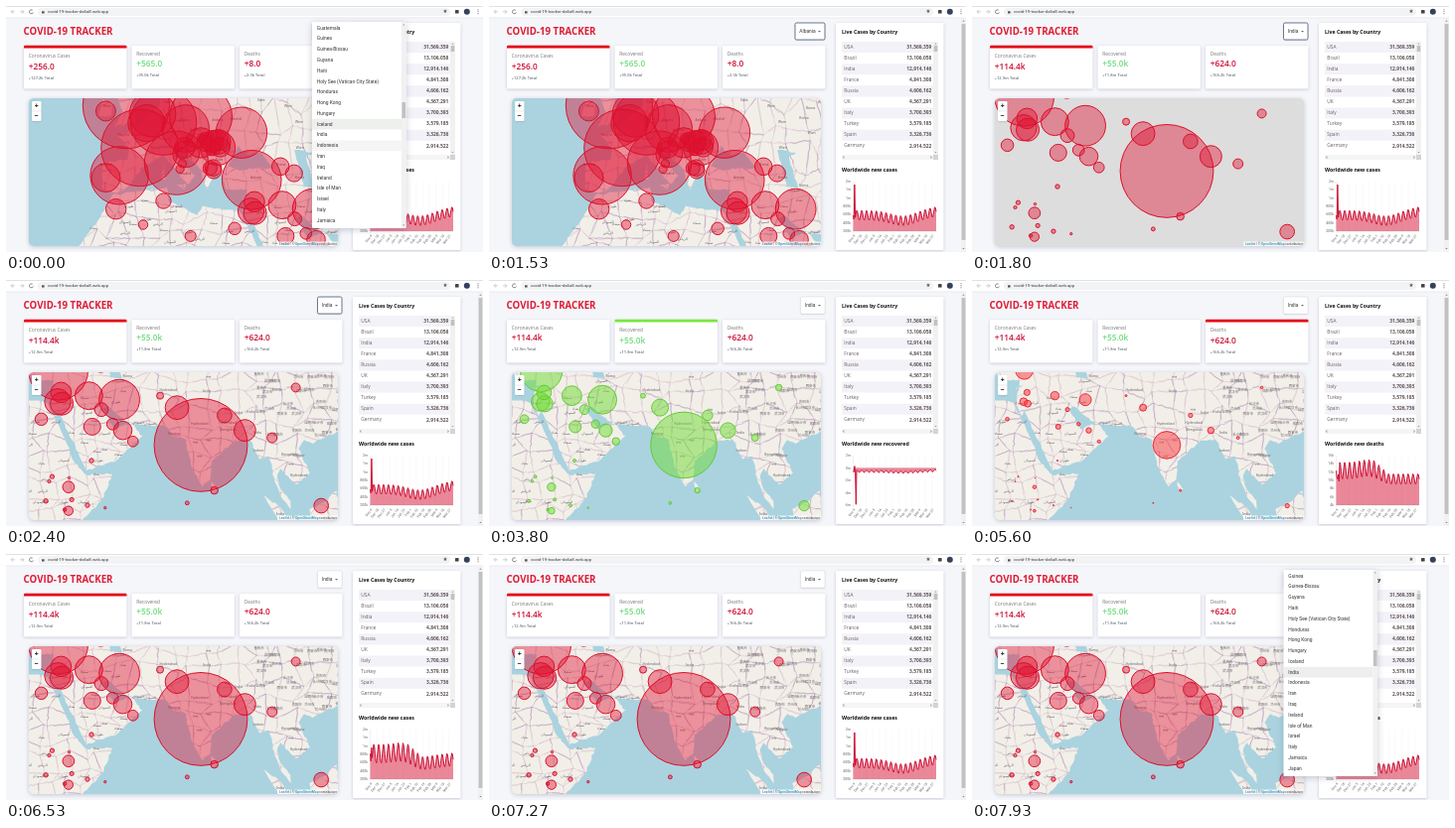
Write an HTML page with a canvas that moves like this. It is 480 px wide and 248 px high and loops after 8 s.

```html
<!DOCTYPE html>
<html lang="en">
<head>
<meta charset="utf-8">
<title>COVID-19 Tracker</title>
<style>
html, body { margin: 0; width: 100%; height: 100%; overflow: hidden; background: #f5f6fa; }
canvas { display: block; width: 480px; height: 248px; }
</style>
</head>
<body>
<canvas id="stage"></canvas>
<script>
const ratio = window.devicePixelRatio || 1;
function setUp(canvas) {
  canvas.width = 480 * ratio;
  canvas.height = 248 * ratio;
  const context = canvas.getContext('2d');
  context.scale(ratio, ratio);
  return context;
}
const page = setUp(document.getElementById('stage'));
let g = page;

const LOOP = 8000;
const T = { hover: 300, close: 600, load: 1800, blur: 3330, recovered: 3450, deaths: 5370, cases: 6400, open: 7500 };
const OPEN = '"Open Sans", sans-serif', ROBOTO = 'Roboto, sans-serif';
const RED = '#cc1034';

// ---- helpers ----
const clamp = v => Math.max(0, Math.min(1, v));
const easeOut = p => 1 - (1 - clamp(p)) ** 4;
const rad = d => d * Math.PI / 180;
// Repeatable random number from 0 to 1
function noise(a, b = 0) {
  const v = Math.sin(a * 127.1 + b * 311.7) * 43758.5453;
  return v - Math.floor(v);
}
function box(x, y, w, h, fill, r = 0, shadow = 0) {
  g.save();
  if (shadow) {
    g.shadowColor = 'rgba(70,75,110,.28)';
    g.shadowBlur = shadow * ratio;
    g.shadowOffsetY = shadow / 4 * ratio;
  }
  g.fillStyle = fill;
  g.beginPath();
  g.roundRect(x, y, w, h, r);
  g.fill();
  g.restore();
}
function text(s, x, y, size, color, weight = 400, font = OPEN, align = 'left') {
  g.font = `${weight} ${size}px ${font}`;
  g.fillStyle = color;
  g.textAlign = align;
  g.textBaseline = 'middle';
  g.fillText(s, x, y);
}
function stroke(points, color, width = .7) {
  g.strokeStyle = color;
  g.lineWidth = width;
  g.beginPath();
  points.forEach(([x, y]) => g.lineTo(x, y));
  g.stroke();
}
function triangle(x, y, r, color, dir = 1) {
  g.fillStyle = color;
  g.beginPath();
  g.moveTo(x - r, y - dir * r / 2);
  g.lineTo(x + r, y - dir * r / 2);
  g.lineTo(x, y + dir * r / 2);
  g.fill();
}
function disc(x, y, r, color) {
  g.fillStyle = color;
  g.beginPath();
  g.arc(x, y, r, 0, 7);
  g.fill();
}

// ---- map: Mercator, coordinates are longitude,latitude ----
const SCALE = 3.4133, MID = [196, 166.4];
const mercator = lat => Math.log(Math.tan(Math.PI / 4 + rad(lat) / 2)) * 180 / Math.PI;
const project = ([lon, lat], [lon0, lat0]) =>
  [MID[0] + (lon - lon0) * SCALE, MID[1] - (mercator(lat) - mercator(lat0)) * SCALE];
const parse = s => s.split(' ').map(p => p.split(',').map(Number));

// Key points only; roughen() adds the small bays and capes
const lands = [
  '8,60 8,54 3.5,51.5 -1.5,49 -4.7,48.5 -1.2,46 -1.5,43.4 -9,43 -9,37 -5.5,36 -2,36.8 0,39 3.2,42 8.8,44.4 12,42 16,38 18.3,40 12.4,44.4 13.7,45.6 19.4,41.8 22,36.7 24,40.4 26.5,40 27.5,36.8 36,36.5 34.3,31.3 32.4,31.2 62,31 62,60',
  '-17,21 -10,29.5 -6,35.5 10,37.2 10.5,34 19,30.4 20.5,32.7 32.4,31.2 32.5,29.9 37.2,21 39.5,15.5 43.3,11.5 51,11.9 48,4.5 39,-5 -17,-5',
  '32.4,31.2 34.2,27.8 34.9,29.4 39,21.5 43.2,12.7 52.2,15.7 59.8,22.4 56.2,26.2 51.6,24.3 48,30 50,30.2 54.5,26.6 57.4,25.7 66.6,25.2 69,22.3 72.7,21.5 72.8,19 74.8,13 77.5,8.1 79.8,10.3 80.2,15.5 87,21.3 92,21.5 92,60 40,60',
  '91,22.5 94.3,16 97.2,16.8 98.7,10 100.3,6 103.5,1.3 103.4,4 100.3,8 99.5,11 100.5,13.3 105,8.7 109.2,12 105.8,19 107.5,21.4 110,20.4 114,22.4 117,23.6 125,26 125,60 91,60',
  '-5.5,50 -3,53 -5,56 -2,57.5 .3,53 1.5,51.2', '-10,52 -6.3,52.2 -6,54.5 -9,55',
  '8.3,39 9.6,39.2 9.2,42.9', '12.5,37.8 15.1,36.7 15.6,38.2', '32.3,34.9 34.5,35.6 33,34.6',
  '80,9.7 81.8,7.5 80.6,6', '95.3,5.6 100.5,2.1 104,-3 101,-3', '109,1.5 113.5,3.6 117,7 118,-3 110,-3'
].map(parse);
const seas = [
  '28,42 31,46.4 33.6,44.5 37.5,45 41.5,41.5 36,41.7 31,41.2',
  '47.5,45.5 53,45 51,44 53.8,37 50.3,37.4 49.5,40.5'
].map(parse);

function roughen(points) {
  return points.flatMap(([x, y], i) => {
    const [x2, y2] = points[(i + 1) % points.length];
    const n = Math.ceil(Math.hypot(x2 - x, y2 - y) / .9);
    return Array.from({ length: n }, (_, k) => {
      const amp = k ? .45 : 0;
      return [x + (x2 - x) * k / n + amp * (noise(x + k, y) - .5), y + (y2 - y) * k / n + amp * (noise(y, x + k) - .5)];
    });
  });
}
function outline(shapes, center) {
  const path = new Path2D();
  for (const shape of shapes) {
    roughen(shape).forEach((p, i) => path[i ? 'lineTo' : 'moveTo'](...project(p, center)));
    path.closePath();
  }
  return path;
}
const words = {
  east: ['西安市', '成都市', '重庆市', '武汉市', '昆明市', '兰州市', '长沙市', '贵阳市'],
  south: ['Nagpur', 'Hyderabad', 'Bengaluru', 'Indore', 'नगर', 'India'],
  middle: ['الرياض', 'بغداد', 'صنعاء', 'طهران', 'السودان'],
  europe: ['Madrid', 'Roma', 'Київ', 'Wien', 'Ankara']
};
const region = (lon, lat) => lon > 94 && lat > 21 ? 'east' : lon > 62 ? 'south' : lat < 37 ? 'middle' : 'europe';

// Still part of the map, painted once for each place
function paintGround(center) {
  const canvas = document.createElement('canvas');
  g = setUp(canvas);
  box(23, 93, 311, 149, '#aad3df');
  const land = outline(lands, center), water = outline(seas, center);
  g.fillStyle = '#f2efe9';
  g.fill(land);
  g.save();
  g.clip(land);
  // Irregular cells stand for states and their borders
  const node = (i, j) => [i * 4.5 + 4 * noise(i, j), j * 4 + 3.5 * noise(j, i + 50)];
  for (let i = -8; i < 28; i++) for (let j = -2; j < 15; j++) {
    const color = noise(i, j + 9) > .55 ? 'rgba(150,105,160,.6)' : 'rgba(190,150,175,.5)';
    for (const end of [node(i + 1, j), node(i, j + 1)]) {
      stroke(roughen([node(i, j), end]).slice(0, -1).map(p => project(p, center)), color, .5);
    }
  }
  g.restore();
  g.fillStyle = '#aad3df';
  g.fill(water);
  for (let i = -10; i < 40; i++) for (let j = -1; j < 20; j++) {
    const lon = i * 3 + 2 * noise(i, j), lat = j * 2.8 + 2 * noise(j, i);
    const [x, y] = project([lon, lat], center), zone = region(lon, lat);
    const onLand = g.isPointInPath(land, x * ratio, y * ratio) && !g.isPointInPath(water, x * ratio, y * ratio);
    if (!onLand || noise(i + 7, j) > (zone === 'east' ? .75 : .25)) continue;
    const list = words[zone];
    text(list[Math.floor(noise(i, j + 3) * list.length)], x, y, 3.4, '#6b656b', 400, '"Noto Sans", "Noto Sans CJK SC", sans-serif', 'center');
  }
  g = page;
  return canvas;
}

// longitude, latitude, thousands of cases
const countries = [
  '-2,54,4367 2,46,4841 9,51,2914 12.8,42.8,3700 -4,40,3326 -8,39.5,826 20,52,2500 15.5,49.8,1570 5.8,52.5,1340 4,50.8,920 20,47,713 25,46,1000 32,49,1890 -8,53,240 -5,32,500 9,34,268 3,28,118 17,25,166',
  '53,32,1984 35,39,3579 44,33,912 34.8,31.5,835 36,31,650 35.8,33.8,487 47.7,29.5,243 45,25,395 54,24,480 51,25.7,187 57,21,167 30,27,207 43.5,42,285 47.5,40.5,279',
  '77,20,12914 70,30,710 90,24,667 84,28,280 81,7,94 65,33,57 98,22,142 112.5,2.5,358 105,35,90 38,8,225 38,1,143 73,3.3,25'
].flatMap(parse);
// Crowded small states of central Europe, then scattered small outbreaks in the south
for (let i = 0; i < 18; i++) countries.push([13 + 13 * noise(i, 1), 41 + 8 * noise(i, 2), 60 + 550 * noise(i, 3) ** 2]);
for (let i = 0; i < 9; i++) countries.push([30 + 20 * noise(i, 4), 1 + 16 * noise(i, 5), 3 + 30 * noise(i, 6)]);

const FATALITY = .013;
const circles = {
  cases: { k: .388, share: 1, stroke: '#dc1028', fill: 'rgba(222,16,48,.42)' },
  recovered: { k: .287, share: .92, stroke: '#62cb32', fill: 'rgba(112,220,52,.5)' },
  deaths: { k: 1, share: FATALITY, stroke: '#f02436', fill: 'rgba(251,58,62,.5)' }
};
const views = [[20, 41], [77, 20]].map(center => ({ center, ground: paintGround(center) }));

function drawMap(t, type) {
  const { center, ground } = views[+(t >= T.load)];
  box(23, 93, 311, 149, '#ddd', 5, 4);
  g.save();
  g.beginPath();
  g.roundRect(23, 93, 311, 149, 5);
  g.clip();
  g.globalAlpha = t < T.load ? 1 : clamp((t - T.load) / 250);
  g.drawImage(ground, 0, 0, 480, 248);
  g.globalAlpha = 1;
  const style = circles[type];
  for (const [lon, lat, cases] of countries) {
    const r = style.k * Math.sqrt(cases * style.share) / Math.cos(rad(lat));
    disc(...project([lon, lat], center), r, style.fill);
    g.strokeStyle = style.stroke;
    g.lineWidth = 1;
    g.stroke();
  }
  box(26, 96, 9.5, 20, '#fff', 1.2, 1.5);
  stroke([[26, 106], [35.5, 106]], '#ccc', .4);
  text('+', 30.7, 100.8, 7, '#111', 700, OPEN, 'center');
  text('−', 30.7, 110.8, 7, '#111', 700, OPEN, 'center');
  box(273, 237.4, 61, 4.6, 'rgba(255,255,255,.72)');
  text('Leaflet', 275, 239.8, 3.4, '#0078a8', 400, ROBOTO);
  text('| ©', 286.2, 239.8, 3.4, '#444', 400, ROBOTO);
  text('OpenStreetMap', 291, 239.8, 3.4, '#0078a8', 400, ROBOTO);
  text('contributors', 315, 239.8, 3.4, '#444', 400, ROBOTO);
  g.restore();
}

// ---- page ----
function drawBrowser(locked) {
  box(0, 0, 480, 12, '#fff');
  box(0, 0, 480, 1, '#dee1e6');
  for (const [tail, tip] of [[9, 5], [14, 18]]) {
    const back = tip + Math.sign(tail - tip) * 2;
    stroke([[tail, 5.8], [tip, 5.8]], '#bbb');
    stroke([[back, 3.8], [tip, 5.8], [back, 7.8]], '#bbb');
  }
  g.strokeStyle = '#555';
  g.beginPath();
  g.arc(25.5, 5.8, 2, .3, 5.4);
  g.stroke();
  box(32, 2, 415, 8, '#f1f3f4', 4);
  box(36, 5.2, 2.6, 2.2, '#555', .3);
  text('covid-19-tracker-da6a8.web.app', 42, 6, 4.3, '#333', 400, ROBOTO);
  text('★', 442, 6, 5.5, '#555', 400, '"DejaVu Sans", sans-serif', 'center');
  box(452, 4, 3.6, 3.6, '#444', .6);
  disc(463.8, 5.8, 3, '#33415c');
  [3.8, 5.8, 7.8].forEach(y => disc(475, y, .5, '#444'));
  stroke([[0, 11.8], [480, 11.8]], '#dadce0', .5);
  if (locked) return;
  box(475, 12, 5, 236, '#f1f1f1');
  box(475.6, 18, 3.8, 218, '#c1c1c1');
  triangle(477.5, 15, 1.2, '#666', -1);
  triangle(477.5, 244.5, 1.2, '#666');
}

const stats = [
  { type: 'cases', title: 'Coronavirus Cases', color: RED, bar: '#e60014', data: [['+256.0', '+127.2k'], ['+114.4k', '+12.9m']] },
  { type: 'recovered', title: 'Recovered', color: '#70dc80', bar: '#78e83c', data: [['+565.0', '+95.0k'], ['+55.0k', '+11.8m']] },
  { type: 'deaths', title: 'Deaths', color: RED, bar: '#e60014', data: [['+8.0', '+2.3k'], ['+624.0', '+166.2k']] }
];
function drawHeader(t, type) {
  text('COVID-19 TRACKER', 17.6, 26.2, 9.7, '#e01c34', 700);
  const loaded = t >= T.load;
  const left = loaded ? 313.5 : 308;
  box(left, 17, 338 - left, 17, '#fff', 1.5, 1.5);
  const focused = t > T.close && t < T.blur;
  g.strokeStyle = focused ? '#465a70' : '#d4d6dc';
  g.lineWidth = focused ? .8 : .4;
  g.beginPath();
  g.roundRect(left, 17, 338 - left, 17, 1.5);
  g.stroke();
  text(loaded ? 'India' : 'Albania', left + 4.3, 25.8, 4.9, '#333', 400, ROBOTO);
  triangle(332.5, 25.8, 1.5, '#666');
  stats.forEach((s, i) => {
    const [value, total] = s.data[+loaded];
    const x = 18 + i * 108.5, active = s.type === type;
    const y = active ? 42.8 : 40;
    box(x, 40, 103.5, 43.5, '#fff', 1.2, 3);
    if (active) box(x, 39.8, 103.5, 2.8, s.bar, [1.2, 1.2, 0, 0]);
    text(s.title, x + 4.8, y + 8.4, 4.85, '#777');
    text(value, x + 4.8, y + 18.6, 8.3, s.color, 600);
    text(total + ' Total', x + 4.8, y + 30, 4, '#6c757d', 600);
  });
}

const table = [['USA', '31,569,359'], ['Brazil', '13,106,058'], ['India', '12,914,146'], ['France', '4,841,308'],
  ['Russia', '4,606,162'], ['UK', '4,367,291'], ['Italy', '3,700,393'], ['Turkey', '3,579,185'],
  ['Spain', '3,326,736'], ['Germany', '2,914,522']];
function drawTable() {
  box(349, 17, 108.5, 229, '#fff', 1.2, 3);
  text('Live Cases by Country', 355, 26.2, 5.2, '#111', 700);
  table.forEach(([name, count], i) => {
    const y = 41.5 + i * 11.08;
    if (i % 2 === 0) box(355, y - 5.5, 92, 11.08, '#f3f2f8');
    text(name, 357.3, y, 4.8, '#6a5d5d');
    text(count, 445.4, y, 4.9, '#5f5454', 700, OPEN, 'right');
  });
  box(447, 36, 5, 114, '#f1f1f1');
  box(447.7, 40, 3.6, 6, '#c1c1c1');
  triangle(449.5, 38, 1, '#777', -1);
  triangle(449.5, 147.5, 1, '#777');
  box(355, 150, 92, 5, '#f5f5f5');
  box(447, 150, 5, 5, '#d4d4d4');
  text('‹', 357, 152.2, 5, '#777', 700, OPEN, 'center');
  text('›', 445, 152.2, 5, '#777', 700, OPEN, 'center');
}

// ---- chart: each series gives the line height for a day ----
const DAYS = 120, LEFT = 366.5, RIGHT = 450, BOTTOM = 227, ZERO = 189.5;
const bump = (i, at, width) => Math.exp(-(((i - at) / width) ** 2));
const week = i => Math.sin(i / 7 * 2 * Math.PI);
const series = {
  cases: i => i === 2 ? 180 : 211 + 6 * bump(i, 72, 25) - 4 * (i / DAYS) ** 4 + 5 * week(i),
  recovered: i => i === 4 ? 230 : ZERO - .6 + .3 * week(i),
  deaths: i => {
    const fall = clamp((i - 55) / 20);
    return 194 - 4 * bump(i, 45, 15) + 13 * fall + (13 - 5 * fall) * week(i);
  }
};
const ticks = {
  cases: ['2m', '1m', '1m', '800k', '600k', '400k', '200k'],
  recovered: ['2m', '0m', '-2m', '-4m', '-6m'],
  deaths: ['16k', '14k', '12k', '10k', '8k', '6k', '4k']
};
function drawChart(type, from, progress) {
  text('Worldwide new ' + type, 355, 165.4, 5.25, '#111', 700);
  const labels = ticks[type];
  labels.forEach((s, i) => text(s, 364, 177 + i * 50 / (labels.length - 1), 3.5, '#666', 400, ROBOTO, 'right'));
  stroke([[LEFT, 177], [LEFT, BOTTOM + 2]], '#ddd', .4);
  for (let i = 0; i < 13; i++) {
    const x = LEFT + i * 6.6;
    const date = new Date(2020, 11, 9 + i * 9).toLocaleDateString('en-US', { month: 'short', day: 'numeric' });
    stroke([[x, 177], [x, BOTTOM + 2]], '#ececec', .3);
    g.save();
    g.translate(x + 1.5, 231);
    g.rotate(-.9);
    text(date, 0, 0, 3.5, '#666', 400, ROBOTO, 'right');
    g.restore();
  }
  const line = Array.from({ length: DAYS }, (_, i) => [
    LEFT + i * (RIGHT - LEFT) / (DAYS - 1),
    series[from](i) * (1 - progress) + series[type](i) * progress
  ]);
  const base = type === 'recovered' ? ZERO : BOTTOM;
  stroke([[LEFT, base], [RIGHT, base]], '#ccc', .4);
  g.fillStyle = 'rgba(214,16,52,.5)';
  g.beginPath();
  g.moveTo(LEFT, base);
  line.forEach(([x, y]) => g.lineTo(x, y));
  g.lineTo(RIGHT, base);
  g.fill();
  g.lineJoin = 'round';
  stroke(line, RED, 1);
}

// ---- country menu ----
const names = ['Guatemala', 'Guinea', 'Guinea-Bissau', 'Guyana', 'Haiti', 'Holy See (Vatican City State)', 'Honduras',
  'Hong Kong', 'Hungary', 'Iceland', 'India', 'Indonesia', 'Iran', 'Iraq', 'Ireland', 'Isle of Man', 'Israel', 'Italy', 'Jamaica', 'Japan'];
function drawMenu(x, first, shades, shown, scale) {
  g.save();
  g.globalAlpha = shown;
  g.translate(x + 47, 120);
  g.scale(scale, scale * scale);
  g.translate(-x - 47, -120);
  box(x, 16, 94.5, 208, '#fff', 1.2, 6);
  names.slice(first, first + 19).forEach((name, i) => {
    const y = 22.2 + i * 10.78;
    if (shades[name]) box(x, y - 5.4, 90, 10.78, shades[name]);
    text(name, x + 4.8, y, 4.9, '#333', 400, ROBOTO);
  });
  box(x + 90, 16, 4.5, 208, '#f1f1f1');
  box(x + 90.4, 97, 3.7, 16, '#c1c1c1');
  triangle(x + 92.2, 18.8, 1.1, '#777', -1);
  triangle(x + 92.2, 221, 1.1, '#777');
  g.restore();
}

function frame() {
  const t = performance.now() % LOOP;
  let type = 'cases', from = 'cases', start = 0;
  for (const next of ['recovered', 'deaths', 'cases']) {
    if (t >= T[next]) [from, type, start] = [type, next, T[next]];
  }
  box(0, 0, 480, 248, '#f5f6fa');
  drawHeader(t, type);
  drawMap(t, type);
  drawTable();
  drawChart(type, from, easeOut((t - start) / 1000));
  drawBrowser(t < T.close || t >= T.open);
  if (t < T.close + 200) {
    const shades = t < T.hover ? { Iceland: '#eef0ee', Indonesia: '#f5f5f5' } : { India: '#ebebeb' };
    const out = clamp((t - T.close) / 200);
    drawMenu(308, 0, shades, 1 - out, 1 - out * .25);
  }
  if (t >= T.open) {
    const p = easeOut((t - T.open) / 250);
    drawMenu(313.5, 1, { India: '#eeeeee' }, p, .75 + .25 * p);
  }
  requestAnimationFrame(frame);
}
frame();
</script>
</body>
</html>
```
